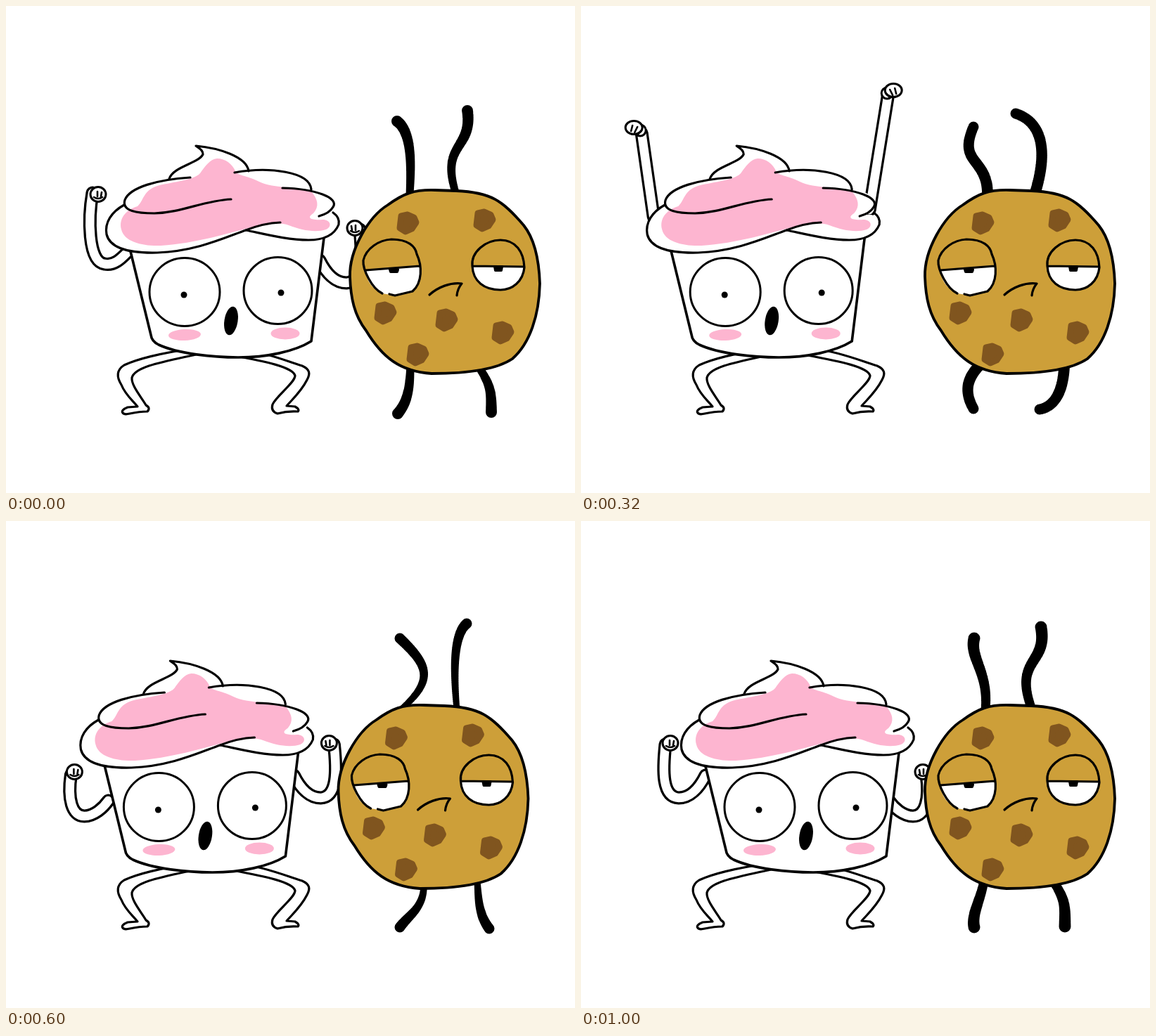
Recreate the animation shown at these times as an HTML page with a canvas. Size 809x693 px, loop 1040 ms.

```html
<!DOCTYPE html>
<html lang="en">
<head>
<meta charset="utf-8">
<title>Dancing cupcake and cookie</title>
<style>
html, body { margin: 0; width: 100%; height: 100%; overflow: hidden; background: #fff; }
canvas { display: block; }
</style>
</head>
<body>
<canvas id="stage" width="809" height="693"></canvas>
<script>
const ctx = document.getElementById('stage').getContext('2d');
const STEP = 40, COUNT = 26;
const PINK = '#fdb5d0', DOUGH = '#cd9f39', CHIP = '#80551f';

ctx.lineCap = ctx.lineJoin = 'round';

function draw(d, fill, width = 3.2, color = '#000') {
  const p = new Path2D(d);
  if (fill) { ctx.fillStyle = fill; ctx.fill(p); }
  if (width) { ctx.lineWidth = width; ctx.strokeStyle = color; ctx.stroke(p); }
}

function oval(x, y, rx, ry, fill, width = 0, turn = 0) {
  ctx.beginPath();
  ctx.ellipse(x, y, rx, ry, turn, 0, 7);
  ctx.fillStyle = fill;
  ctx.fill();
  if (width) { ctx.lineWidth = width; ctx.strokeStyle = '#000'; ctx.stroke(); }
}

function at(dx, paint) {
  ctx.save();
  ctx.translate(dx, 0);
  paint();
  ctx.restore();
}

// Right arm poses from low to high; the left arm is x -> mirror - x.
const ARMS = [
  { mirror: 620, fist: [486, 357], d: 'M491 361C496 395 490 420 472 420C458 420 445 408 438 398' },
  { mirror: 623, fist: [496, 316], d: 'M503 318C507 355 508 393 484 394C468 394 455 380 446 362' },
  { mirror: 622, fist: [491, 268], d: 'M499 266C505 300 506 364 482 367C467 370 457 358 447 348' },
  { mirror: 622, fist: [466, 210], d: 'M472 206C492 215 499 300 489 322C482 343 466 342 450 330' },
  { mirror: 610, fist: [484, 174], d: 'M475 181L458 300', up: true },
  { mirror: 642, fist: [491, 121], d: 'M485 129L459 290', up: true }
];
const ARM_CYCLE = [0, 1, 2, 3, 3, 4, 5, 4, 3, 2, 1, 0];

function arm(step, left) {
  const { mirror, fist: [x, y], d, up } = ARMS[ARM_CYCLE[(step + 12) % 12]];
  ctx.save();
  if (left) { ctx.translate(mirror, 0); ctx.scale(-1, 1); }
  draw(d, null, 19);
  draw(d, null, 12.5, '#fff');
  if (up) {
    oval(x - 7, y + 3, 8, 8, '#fff', 3);
    oval(x + 2, y - 1, 12, 9.5, '#fff', 3);
    draw(`M${x - 3} ${y - 2}l4 8M${x + 4} ${y - 4}l2 8M${x - 9} ${y + 3}l5 5`, null, 2.6);
  } else {
    oval(x, y, 11, 10.5, '#fff', 3);
    draw(`M${x - 5} ${y - 3}l1 6M${x + 1} ${y - 4}v7M${x - 6} ${y + 4}q6 4 12 0`, null, 2.6);
  }
  ctx.restore();
}

function cupcakeLegs() {
  draw('M262 488C220 494 185 503 168 511C157 518 157 528 164 539C170 554 181 562 187 570L173 571Q163 575 166 579Q168 582 176 580Q190 577 201 577Q206 572 199 568C192 556 178 540 179 529C183 513 225 506 270 496', '#fff');
  draw('M335 488C370 493 398 505 421 512C432 517 433 523 428 532C420 548 409 558 399 569L411 570Q418 574 415 577Q400 576 386 580Q376 577 379 567C384 555 411 536 411 526C408 514 370 506 322 497', '#fff');
}

function cupcake() {
  draw('M176 345L206 468Q207 477 217 482C245 495 295 500 330 500C370 500 410 492 434 477L453 322', '#fff', 3.6);

  // Whipped topping: white silhouette, pink shade, then the fold lines
  draw('M168 283C175 258 205 249 232 246C238 228 274 224 280 211C280 205 275 203 270 199C302 202 342 214 345 235C380 228 428 238 434 261C462 264 472 278 464 288C461 293 455 296 452 297C468 295 476 304 473 311C466 328 450 333 430 333C400 333 370 325 341 319C310 330 270 349 215 351C175 352 148 345 143 325C140 308 150 293 168 283Z', '#fff', 0);
  draw('M300 217C290 218 283 228 276 238C265 250 225 251 210 258C195 265 195 278 187 285C170 290 160 303 164 318C168 336 195 342 220 341C270 338 320 322 345 316C375 308 390 308 402 312C420 319 440 323 455 318C464 314 462 304 450 304C435 305 426 302 437 295C446 285 443 275 435 265C420 257 380 260 360 250C340 240 330 242 326 235C322 225 312 217 300 217Z', PINK, 0);
  draw('M262 244C215 247 176 258 169 276C164 292 187 295 211 295C250 294 280 277 320 275', null);
  draw('M232 246C238 228 274 224 280 211C280 205 275 203 270 199C302 202 342 214 345 235', null);
  draw('M325 237C375 228 432 236 434 261M393 259C440 260 474 273 465 286Q460 295 445 299', null);
  draw('M168 283C150 293 140 308 143 325C148 345 175 352 215 351C270 349 310 330 341 319Q366 309 390 308', null);
  draw('M341 319C370 325 400 333 430 333C450 333 466 328 473 311Q475 301 465 294', null);

  oval(254, 407, 50, 48.5, '#fff', 3);
  oval(386.5, 405, 48.5, 47.5, '#fff', 3);
  oval(253, 411, 4.5, 4.5, '#000');
  oval(391, 408, 4.5, 4.5, '#000');
  oval(320, 448, 9.5, 20.5, '#000', 0, 0.16);
  oval(254, 468, 23, 8, PINK, 0, -0.04);
  oval(397, 466, 20.5, 8.5, PINK);
}

// Limb keys: tip, two control points, x of the joint
const KEY_STEPS = [0, 2, 5, 8, 12, 13];
const LIMBS = [
  { joint: 268, keys: [
    [556, 164, 578, 180, 576, 230, 574], [560, 167, 600, 205, 610, 225, 562],
    [590, 166, 578, 230, 556, 205, 562], [558, 172, 535, 225, 578, 215, 578],
    [559, 167, 552, 195, 580, 215, 575]] },
  { joint: 268, keys: [
    [656, 149, 664, 205, 616, 195, 640], [655, 146, 638, 160, 635, 205, 641],
    [637, 151, 585, 215, 665, 195, 650], [618, 153, 655, 165, 665, 205, 645],
    [654, 151, 664, 205, 614, 195, 641]] },
  { joint: 512, keys: [
    [557, 580, 574, 560, 574, 535, 575], [560, 578, 575, 558, 596, 550, 594],
    [591, 579, 578, 560, 592, 540, 562], [558, 573, 548, 555, 544, 535, 566],
    [559, 578, 555, 560, 568, 540, 573]] },
  { joint: 512, keys: [
    [690, 578, 690, 550, 690, 540, 671], [687, 580, 672, 560, 672, 540, 670],
    [671, 577, 665, 550, 644, 550, 654], [652, 574, 675, 570, 686, 545, 687],
    [688, 577, 688, 550, 690, 540, 671]] }
];
const WIDTHS = [[16, 11], [15, 9], [16, 15], [15, 16], [17, 13]]; // tip, joint

const mix = (a, b, u) => a.map((v, n) => v + (b[n] - v) * u);
const bezier = (a, b, c, d, u) => {
  const v = 1 - u;
  return a * v ** 3 + 3 * b * v * v * u + 3 * c * v * u * u + d * u ** 3;
};

function limbs(step) {
  const k = KEY_STEPS.findLastIndex((s, n) => n < 5 && s <= step);
  const next = (k + 1) % 5;
  const u = (step - KEY_STEPS[k]) / (KEY_STEPS[k + 1] - KEY_STEPS[k]);
  const [tip, base] = mix(WIDTHS[k], WIDTHS[next], u);
  ctx.fillStyle = '#000';
  for (const { joint, keys } of LIMBS) {
    const [ax, ay, bx, by, cx, cy, dx] = mix(keys[k], keys[next], u);
    ctx.beginPath();
    for (let s = 0; s <= 1; s += 1 / 64) {
      const x = bezier(ax, bx, cx, dx, s), y = bezier(ay, by, cy, joint, s);
      const r = (tip + (base - tip) * s) / 2;
      ctx.moveTo(x + r, y);
      ctx.arc(x, y, r, 0, 7);
    }
    ctx.fill();
  }
}

function cookie() {
  draw('M489 385C488 348 515 300 543 283C565 267 580 261 610 262L640 263C690 265 706 277 736 312C752 332 758 365 759 395C758 440 745 480 720 502C695 519 650 523 605 523C560 520 535 500 512 462C495 440 490 415 489 385Z', DOUGH, 3.8);
  for (const [x, y] of [[572, 308], [681, 304], [540, 436], [627, 446], [707, 464], [586, 495]])
    draw(`M${x - 10} ${y - 9}l9-2 9 4 3 7-6 9-9 4-8-5z`, CHIP, 9, CHIP);

  draw('M511 376L589 370C592 395 580 404 571 408L553 412L535 409C520 402 512 390 511 376Z', '#fff', 0);
  draw('M535 409C520 402 507 375 508 362C512 345 530 333 548 332C572 332 582 342 584 353C592 370 592 394 578 406L553 412L545 410M511 376L588 370', null);
  draw('M663 370L737 371C737 390 722 404 703 404C680 404 664 392 663 370Z', '#fff', 0);
  draw('M663 370C661 350 682 333 703 333C725 333 736 350 737 372C735 392 720 404 703 404C680 404 664 392 663 370L737 371', null);
  draw('M546 375h11l-1 3h-9z', '#000', 4);
  draw('M695 371h10l-1 5h-8z', '#000', 4);
  draw('M602 411C614 400 632 393 648 395Q642 402 641 412', null);
}

const SHAKE = [0, 0, -7, -16.5, -23, -23, -16.5, -7];

function render(now) {
  const i = Math.floor(now / STEP) % COUNT;
  // Both sways hold for one extra step so that they fit the loop
  const sway = -12.2 * (6 - Math.abs(6 - (i - (i > 18)) % 12));
  const shake = SHAKE[(i - (i > 13)) % 8];

  ctx.fillStyle = '#fff';
  ctx.fillRect(0, 0, 809, 693);
  cupcakeLegs();
  at(sway, () => {
    arm(i - 3, true);
    arm(i - 2, false);
    cupcake();
  });
  limbs(i % 13);
  at(shake, cookie);
}

const start = performance.now();
(function loop() {
  render(performance.now() - start);
  requestAnimationFrame(loop);
})();
</script>
</body>
</html>
```
